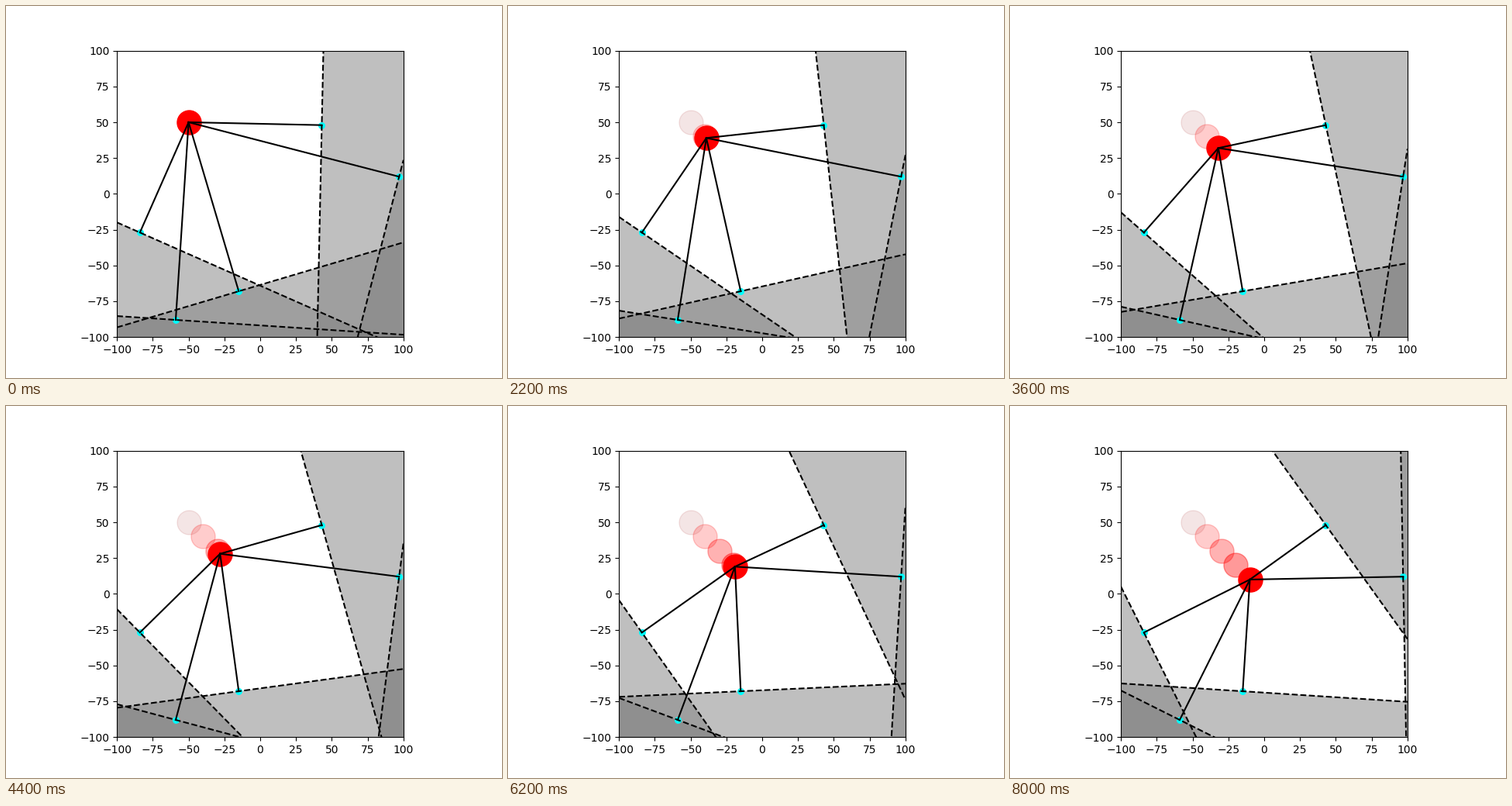
Recreate the animation shown at these times as a matplotlib script. Size 640 by 480 pixels, loop 8.2 s.

```python
import matplotlib.pyplot as plt
import numpy as np
from matplotlib.animation import FuncAnimation

LIM = 100
STEPS = 41
GHOST_EVERY = 10
START = np.array([-50.0, 50.0])
STEP = np.array([1.0, -1.0])
OBSTACLES = np.array([(43, 48), (97, 12), (-84, -27), (-59, -88), (-15, -68)], float)


def robot_at(i):
    return START + i * STEP


def half_plane(point, robot):
    """Quad covering everything beyond the line through point, facing robot."""
    normal = (point - robot) / np.hypot(*(point - robot))
    along = 500 * np.array([-normal[1], normal[0]])
    a, b = point - along, point + along
    return [a, b, b + 500 * normal, a + 500 * normal]


def boundary(point, robot):
    dx, dy = point - robot
    if dy == 0:
        dy = -0.01  # avoid an infinite slope
    x = np.array([-LIM, LIM])
    return x, point[1] - dx / dy * (x - point[0])


fig, ax = plt.subplots(figsize=(6.4, 4.8), dpi=100)
ax.set_xlim(-LIM, LIM)
ax.set_ylim(-LIM, LIM)
ax.set_aspect("equal")

shades = [ax.fill([0, 0, 0], [0, 0, 0], color="gray", alpha=0.5, lw=0)[0]
          for _ in OBSTACLES]
edges = [ax.plot([], [], "k--")[0] for _ in OBSTACLES]
rays = [ax.plot([], [], "k-")[0] for _ in OBSTACLES]

ghosts = []
for k in range(4):
    x, y = robot_at(k * GHOST_EVERY)
    color = "red" if k else "#9b0000"
    ghosts.append(ax.scatter(x, y, s=500, color=color, alpha=0.1 * (k + 1), zorder=1.2))
robot_dot = ax.scatter(*START, s=500, color="red", zorder=1.3)
ax.scatter(*OBSTACLES.T, s=30, color="cyan", zorder=1.4)


def update(i):
    robot = robot_at(i)
    robot_dot.set_offsets([robot])
    for k, ghost in enumerate(ghosts):
        ghost.set_visible(i > k * GHOST_EVERY)
    for point, shade, edge, ray in zip(OBSTACLES, shades, edges, rays):
        shade.set_xy(half_plane(point, robot))
        edge.set_data(*boundary(point, robot))
        ray.set_data(*zip(robot, point))
    return [*shades, *edges, *rays, *ghosts, robot_dot]


anim = FuncAnimation(fig, update, frames=STEPS, interval=200,
                     init_func=lambda: update(0), repeat=True, repeat_delay=0)
plt.show()
```
